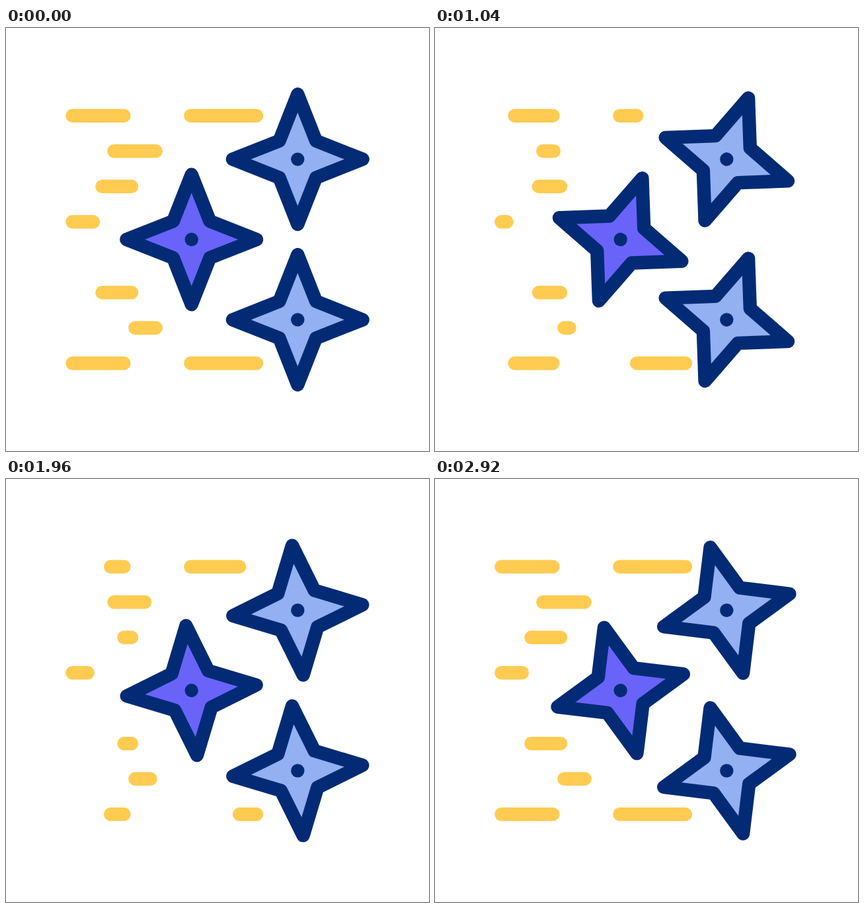
These frames come from a looping animation (640x640 px, 2.96 s). An HTML page:

```html
<!DOCTYPE html>
<html lang="en">
<head>
<meta charset="utf-8">
<title>Throwing stars</title>
<style>
  html, body { margin: 0; width: 100%; height: 100%; overflow: hidden; background: #fff; }
  svg { display: block; width: 100vw; height: 100vh; }
  .bar { stroke: #ffcb51; }
  .edge { stroke: #032b75; }
  .hub { fill: #032b75; }
</style>
</head>
<body>
<svg id="stage" viewBox="0 0 640 640" fill="none" stroke-width="20.4"
     stroke-linecap="round" stroke-linejoin="round"></svg>
<script>
const STEP = 40, STEPS = 74, TURNS = 3;
const HALF = 3;          // steps a bar takes to leave or to return
const LAST = 72;         // step at which the bars come to rest
const MIDDLE = 320, LEFT = 100.4, ROW_GAP = 53.5, LAST_ROW = 7;
const TIP = 98.3, NOTCH = 27.8;

const stage = document.getElementById('stage');
const bars = [], stars = [];

function add(parent, tag, attrs = {}) {
  const node = document.createElementNS('http://www.w3.org/2000/svg', tag);
  for (const key in attrs) node.setAttribute(key, attrs[key]);
  return parent.appendChild(node);
}

// Late bars move half a cycle after the others and rest half a cycle sooner.
function addBar(row, offset, span, late) {
  const y = MIDDLE + (row - LAST_ROW / 2) * ROW_GAP;
  const left = LEFT + offset;
  const wait = late ? HALF : 0;
  const node = add(stage, 'line', { class: 'bar', y1: y, y2: y });
  bars.push({ node, left, right: left + span, wait });
}

// Rows mirror each other about the middle.
for (const bottom of [false, true]) {
  const row = depth => bottom ? LAST_ROW - depth : depth;
  const inset = bottom ? 32 : 0;
  addBar(row(0), 0, 78, true);
  addBar(row(0), 179, 99.6, bottom);
  addBar(row(1), 63 + inset, 63.3 - inset, false);
  addBar(row(2), 45, 44.6, true);
  if (!bottom) addBar(row(3), 0, 31.5, false);
}

// Eight corners, alternating between tips and notches.
const outline = 'M' + Array.from({ length: 8 }, (_, i) => {
  const radius = i % 2 ? NOTCH * Math.SQRT2 : TIP;
  const a = i * Math.PI / 4;
  return `${radius * Math.sin(a)} ${-radius * Math.cos(a)}`;
}).join('L') + 'Z';

function addStar(x, y, fill) {
  const node = add(stage, 'g');
  add(node, 'path', { class: 'edge', d: outline, fill });
  add(node, 'circle', { class: 'hub', r: 10.2 });
  stars.push({ node, x, y });
}

addStar(280.7, MIDDLE, '#6963fa');
for (const side of [-1, 1]) addStar(441.3, MIDDLE + side * 121.4, '#92b0f2');

const ease = u => u * u * (3 - 2 * u);

// Bars slide out to the left, then grow back in from the right.
function drawBar({ node, left, right, wait }, step) {
  const span = right - left;
  const moving = step > wait && step < LAST - wait;
  const phase = moving ? (step - wait) % (2 * HALF) / HALF : 0;
  const x1 = phase < 1 ? left : right - span * ease(phase - 1);
  const x2 = phase < 1 ? right - span * ease(phase) : right;
  node.setAttribute('x1', x1);
  node.setAttribute('x2', x2);
  node.setAttribute('visibility', x2 > x1 ? 'visible' : 'hidden');
}

function draw(time) {
  const step = Math.floor(time / STEP + 0.001) % STEPS;
  const angle = 360 * TURNS * step / STEPS;
  for (const bar of bars) drawBar(bar, step);
  for (const { node, x, y } of stars)
    node.setAttribute('transform', `translate(${x} ${y}) rotate(${angle})`);
}

const start = performance.now();
function tick() {
  draw(performance.now() - start);
  requestAnimationFrame(tick);
}
tick();
</script>
</body>
</html>
```
